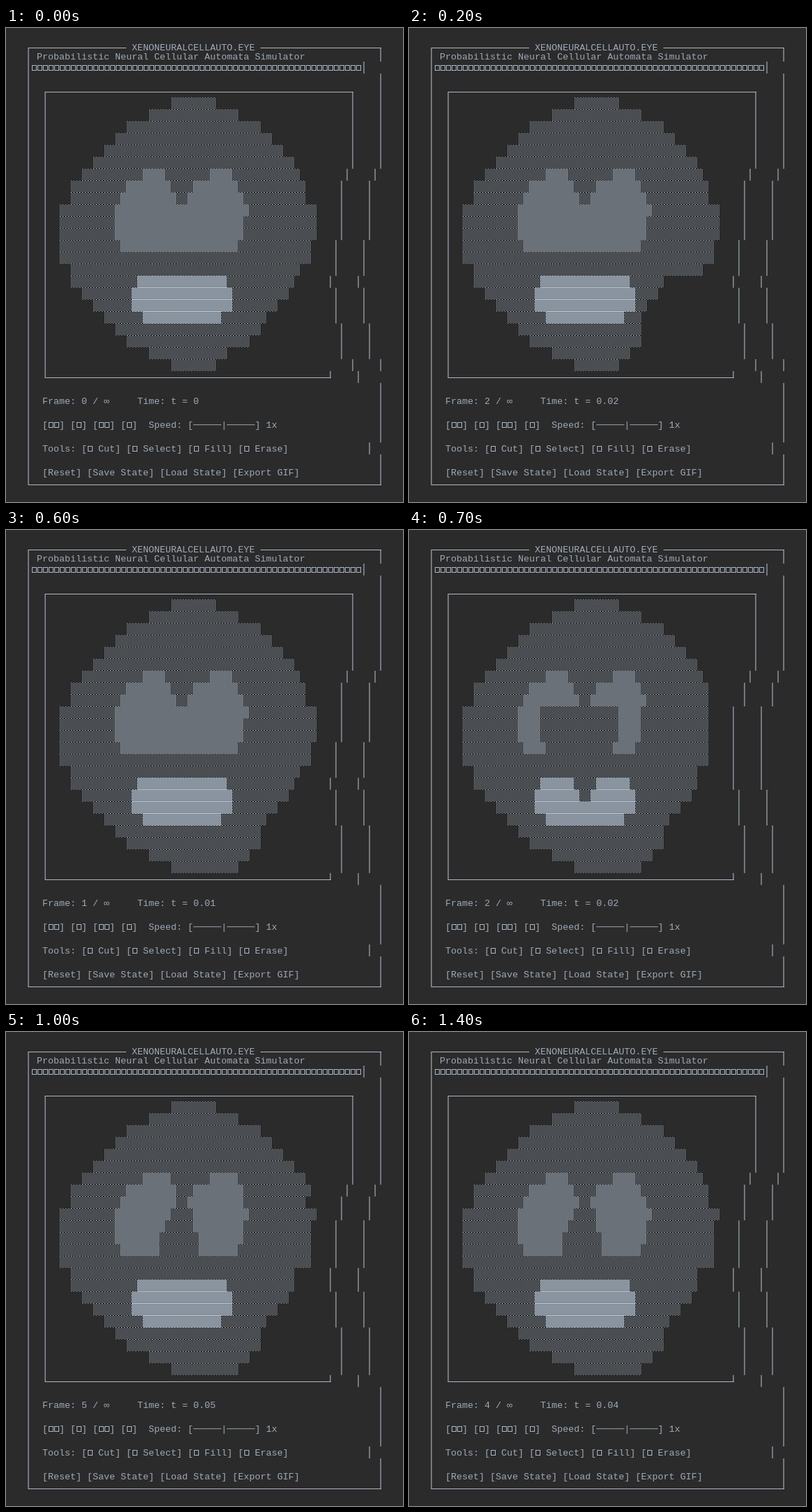
These frames come from a looping animation (568 px wide and 677 px high, 1500 ms). An HTML page with a canvas:

```html
<!DOCTYPE html>
<html lang="en">
<head>
<meta charset="utf-8">
<title>Cellular automata simulator</title>
<style>
  html, body { margin: 0; width: 100%; height: 100%; overflow: hidden; background: #2b2b2b; }
  #panel { position: absolute; left: 0; top: 0; width: 568px; height: 677px; }
  canvas, svg { position: absolute; left: 0; top: 0; display: block; }
  text {
    font: 13.333px "Liberation Mono", "Courier New", monospace;
    fill: #a9b7c6;
    fill-opacity: .9;
    white-space: pre;
  }
</style>
</head>
<body>
<div id="panel">
  <canvas id="grid" width="568" height="677"></canvas>
  <svg width="568" height="677">
    <text x="180" y="32">XENONEURALCELLAUTO.EYE</text>
    <text x="44" y="45">Probabilistic Neural Cellular Automata Simulator</text>
    <text x="52" y="537" id="status"></text>
    <text x="52" y="571" class="tofu">[□□] [□] [□□] [□]  Speed: [─────|─────] 1x</text>
    <text x="52" y="605" class="tofu">Tools: [□ Cut] [□ Select] [□ Fill] [□ Erase]</text>
    <text x="52" y="639">[Reset] [Save State] [Load State] [Export GIF]</text>
  </svg>
</div>
<script>
const INK = '#a9b7c6', CELL = 8, ROW = 17, LEFT = 28, TOP = 99, ROWS = 23;
const { abs, ceil, max, min, round } = Math;
const panel = document.getElementById('panel');
const status = document.getElementById('status');
const ctx = document.getElementById('grid').getContext('2d');
const colX = c => LEFT + c * CELL;
const rowY = r => TOP + r * ROW;

// Shade fills, tiled from 4x4 pixels.
function shade(lit) {
  const tile = document.createElement('canvas');
  tile.width = tile.height = 4;
  const t = tile.getContext('2d');
  t.fillStyle = INK;
  for (let y = 0; y < 4; y++)
    for (let x = 0; x < 4; x++)
      if (lit(x, y)) t.fillRect(x, y, 1, 1);
  return ctx.createPattern(tile, 'repeat');
}
const light = shade((x, y) => x === (y % 2 ? 3 : 1));
const medium = shade((x, y) => (x + y) % 2 === 0);
const dark = shade((x, y) => y % 2 === 0 || x % 2 === (y - 1) / 2);

// Characters missing from a row, as {first row: count}; they pull its right side in.
const upper = { 6: 1, 7: 2 }, lower = { 16: 3, 19: 2 };
const full = { ...upper, 12: 3, 15: 4, ...lower };
const eyesOpen = { 10: 3, 14: 4, ...lower };
const poses = {
  rest: { loss: { ...full, 22: 0 } },
  bitten: { loss: { ...full, 15: 1, 16: 0, 17: -1, 19: -2, 21: 0 }, cut: 36 },
  healing: { loss: { ...full, 22: 0 }, cut: 38 },
  grown: { loss: full, chin: true },
  hollow: { loss: { ...upper, 9: 4, ...lower }, chin: true, eyes: 'hollow' },
  split: { loss: { ...upper, ...eyesOpen }, chin: true, eyes: 'split' },
  wide: { loss: { 7: 1, 8: 2, ...eyesOpen }, chin: true, eyes: 'split', swell: 1 }
};
const { rest, bitten, healing, grown, hollow, split, wide } = poses;
const steps = [rest, bitten, healing, rest, grown, grown, grown, hollow,
               hollow, split, wide, split, split, split, split];

function lossAt(pose, r) {
  const keys = Object.keys(pose.loss).filter(k => k <= r);
  return keys.length ? pose.loss[max(...keys)] : 0;
}

function bodySpan(pose, r) {
  const half = 2 * round(12.24 - .083 * (r - 11) ** 2);
  let end = 30 + half - lossAt(pose, r);
  if (pose.cut && r > 14) end = min(end, round(pose.cut + 1.45 * max(0, 18 - r)));
  if (pose.chin && r > 19) end = max(end, 82 - 2 * r);
  return [30 - half, end];
}

function eyeSpans(pose, r) {
  const a = 16 + round(.08 * abs(r - 10) ** 3);
  const b = max(24, 27 - abs(r - 8));
  const c = max(a + 12, ceil(25 + r / 2));
  const d = round(40 - abs(r - 9) * (r < 9 ? 1 : .6));
  const grow = r < 8 && pose.swell || 0;
  if (r < 9 || pose.eyes === 'split') return [[a, b + grow], [c, d + grow]];
  return pose.eyes === 'hollow' ? [[a, a + 4], [50 - a, 54 - a]] : [[a, d]];
}

function mouthSpans(pose, r) {
  const half = round(9 - .6 * (r - 16.3) ** 2);
  const gap = pose.eyes === 'hollow' ? max(0, 17 - r) : 0;
  return [[28 - half, 28 - gap], [28 + gap, 28 + half]];
}

function vline(col, y0, y1) { ctx.fillRect(colX(col) + 3.5, y0, 1.1, y1 - y0); }
function hline(y, x0, x1) { ctx.fillRect(x0, y, x1 - x0, 1); }
function tofu(x, y) { ctx.strokeRect(x + 1.5, y + 5.5, 6, 7); }

// The fill restarts at the top of every text row.
function span([a, b], r, fill) {
  const w = (b - a) * CELL;
  ctx.save();
  ctx.translate(colX(a), rowY(r));
  ctx.clearRect(0, 0, w, ROW);
  ctx.fillStyle = fill;
  ctx.fillRect(0, 0, w, ROW);
  ctx.restore();
}

const boxes = [];
for (let c = 1; c < 60; c++) boxes.push([colX(c), rowY(-3)]);
document.querySelectorAll('.tofu').forEach(el => {
  const x = +el.getAttribute('x'), y = +el.getAttribute('y') - 13;
  [...el.textContent].forEach((ch, i) => { if (ch === '□') boxes.push([x + i * CELL, y]); });
  el.textContent = el.textContent.replace(/□/g, '\u00a0');
});

function drawFrame() {
  hline(28, 32, 172);
  hline(28, 364, 537);
  hline(652, 32, 537);
  vline(0, 28, 653);
  hline(91, 56, 497);
  hline(499, 56, 465);
  vline(3, 91, 500);
  vline(58, 91, TOP);
  vline(54, 490, 500);
  vline(63, 28, 48);
  vline(60, 48, 65);
  vline(63, 65, TOP);
  vline(59, 490, 507);
  vline(63, 507, 592);
  vline(61, 592, 609);
  vline(63, 609, 653);
  boxes.forEach(b => tofu(...b));
}

function drawFace(pose) {
  for (let r = 0; r < ROWS; r++) {
    const edge = 58 - lossAt(pose, r);
    vline(edge, rowY(r), rowY(r + 1));
    vline(edge + 5, rowY(r), rowY(r + 1));
    span(bodySpan(pose, r), r, light);
    if (r >= 6 && r <= 12) eyeSpans(pose, r).forEach(s => span(s, r, medium));
    if (r >= 15 && r <= 18) mouthSpans(pose, r).forEach(s => span(s, r, dark));
  }
}

let shown = -1;
function tick(now) {
  const step = Math.floor(now % 1500 / 100);
  if (step !== shown) {
    shown = step;
    const pose = steps[step];
    const count = step ? (step - 1) % 5 + 1 : 0;
    ctx.clearRect(0, 0, 568, 677);
    ctx.fillStyle = ctx.strokeStyle = INK;
    drawFrame();
    drawFace(pose);
    status.textContent = `Frame: ${count} / ∞     Time: t = ${count / 100}`;
    // The widest layout re-centres one column to the left.
    panel.style.transform = pose === bitten ? 'translateX(-8px)' : 'none';
  }
  requestAnimationFrame(() => tick(performance.now() - begin));
}
const begin = performance.now();
tick(0);
</script>
</body>
</html>
```
